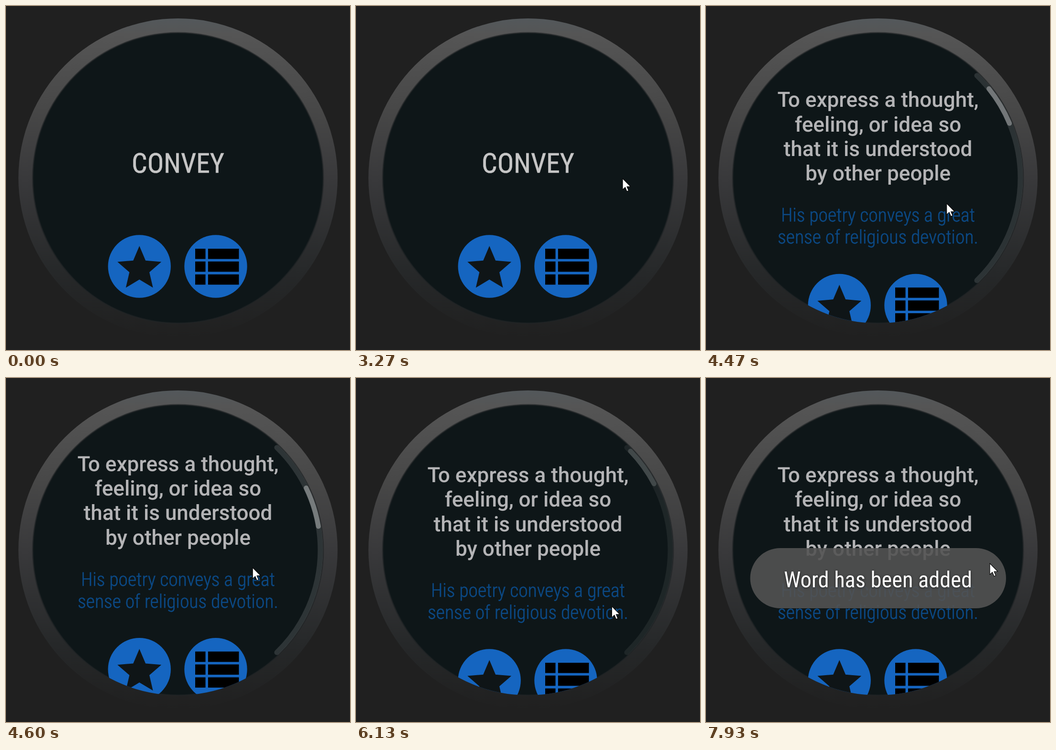
Recreate the animation shown at these times as an HTML page. Size 720x720 px, loop 8 s.

```html
<!DOCTYPE html>
<html lang="en">
<head>
<meta charset="utf-8">
<title>Word of the day on a watch</title>
<style>
  html, body { margin: 0; width: 100%; height: 100%; overflow: hidden; background: #202020; }
  svg { display: block; width: 100vw; height: 100vh; }
  text { font-family: Roboto, sans-serif; text-anchor: middle; text-rendering: geometricPrecision; }
  .narrow { font-family: "Roboto Condensed", Roboto, sans-serif; font-stretch: 75%; stroke-width: .6; }
  .word { font-size: 57.5px; fill: #c6c6c6; stroke: #c6c6c6; }
  .meaning { font-size: 44px; font-weight: 500; fill: #b4b4b6; }
  .example { font-size: 39.6px; font-weight: 300; fill: #0c4a86; stroke: #0c4a86; }
  .note { font-size: 46.4px; fill: #fff; text-shadow: 0 1px 5px rgba(0, 0, 0, .6); }
</style>
</head>
<body>
<svg viewBox="0 0 720 720">
  <defs>
    <linearGradient id="bezel" gradientUnits="userSpaceOnUse" x1="0" y1="26" x2="0" y2="694">
      <stop offset="0" stop-color="#53585b"/>
      <stop offset=".05" stop-color="#555"/>
      <stop offset=".29" stop-color="#474747"/>
      <stop offset=".5" stop-color="#39393b"/>
      <stop offset=".8" stop-color="#262829"/>
      <stop offset="1" stop-color="#202020"/>
    </linearGradient>
    <clipPath id="face"><circle cx="360" cy="360" r="304"/></clipPath>
  </defs>
  <rect width="720" height="720" fill="#202020"/>
  <circle cx="360" cy="360" r="334" fill="url(#bezel)"/>
  <circle cx="360" cy="360" r="304" fill="#0e1618" stroke="#222627" stroke-opacity=".6" stroke-width="3"/>
  <g clip-path="url(#face)">
    <g id="word"></g>
    <g id="page"></g>
    <g id="buttons">
      <circle cx="279.2" cy="545" r="65.7" fill="#1565c0"/>
      <circle cx="439" cy="545" r="65.7" fill="#1565c0"/>
      <path transform="translate(224 493) scale(4.6)" fill="#0f1517"
        d="M12 17.27 18.18 21 16.54 13.97 22 9.24 14.81 8.63 12 2 9.19 8.63 2 9.24 7.46 13.97 5.82 21z"/>
      <path transform="translate(374.5 481) scale(5.38)"
        d="M4 5h4v4H4zM4 10h4v4H4zM4 15h4v4H4zM9 5h12v4H9zM9 10h12v4H9zM9 15h12v4H9z"/>
    </g>
    <g id="bar" fill="none" stroke="#fff" stroke-linecap="round">
      <path id="track" stroke-width="11" stroke-opacity=".13"/>
      <path id="thumb" stroke-width="10" stroke-opacity=".35"/>
    </g>
  </g>
  <g id="toast">
    <rect x="92.5" y="356" width="535.5" height="126" rx="63" fill="#535353" fill-opacity=".9"/>
  </g>
  <path id="cursor" fill="#fff" stroke="#0a0a0a" stroke-width="1.2" stroke-linejoin="round"
    d="M0 0V23.5L5.4 18.4 8.9 27 12.6 25.5 9 17H16.8Z"/>
</svg>
<script>
const $ = id => document.getElementById(id);
const LOOP = 8000, FPS = 15;

function addText(parent, cls, y, str) {
  const el = document.createElementNS('http://www.w3.org/2000/svg', 'text');
  el.setAttribute('class', cls);
  el.setAttribute('transform', `translate(360 ${y})`);
  el.textContent = str;
  parent.append(el);
  return el;
}

addText($('word'), 'word narrow', 348.5, 'CONVEY');
['To express a thought,', 'feeling, or idea so', 'that it is understood', 'by other people']
  .forEach((s, i) => addText($('page'), 'meaning', 218 + i * 51.3, s));
['His poetry conveys a great', 'sense of religious devotion.']
  .forEach((s, i) => addText($('page'), 'example narrow', 458 + i * 45.8, s));
addText($('toast'), 'note narrow', 438, 'Word has been added');

// Synthesize the condensed cut only when no real one is installed
const probe = addText($('page'), 'narrow', 0, 'condensed');
const slim = probe.getComputedTextLength();
probe.setAttribute('class', '');
const hasNarrow = slim < probe.getComputedTextLength() * 0.95;
probe.remove();
if (!hasNarrow) {
  for (const el of document.querySelectorAll('.narrow')) {
    el.setAttribute('transform', el.getAttribute('transform') + ' scale(.882 1)');
  }
}

// Smooth 0 to 1 between two times
function ramp(t, from, to) {
  const p = Math.min(1, Math.max(0, (t - from) / (to - from)));
  return p * p * (3 - 2 * p);
}

// Pointer strokes: start, end, destination
const strokes = [
  { from: 2467, to: 3000, x: 558, y: 361 },
  { from: 3800, to: 4133, x: 488, y: 434 },
  { from: 4250, to: 4680, x: 519, y: 393 },
  { from: 5067, to: 5467, x: 546, y: 433 },
  { from: 5467, to: 5800, x: 551, y: 469 },
  { from: 6000, to: 6867, x: 306, y: 608 },
  { from: 7100, to: 7933, x: 594, y: 388 }
];

function pointerAt(t) {
  let x = 352, y = 329.5;
  for (const s of strokes) {
    const p = ramp(t, s.from, s.to);
    x += (s.x - x) * p;
    y += (s.y - y) * p;
  }
  return `${x} ${y}`;
}

function arc(from, to) {
  const at = deg => {
    const r = deg * Math.PI / 180;
    return `${360 + 298 * Math.cos(r)} ${360 + 298 * Math.sin(r)}`;
  };
  return `M${at(from)}A298 298 0 0 1 ${at(to)}`;
}
$('track').setAttribute('d', arc(-46, 46));

function draw(ms) {
  const t = Math.floor((ms % LOOP + 4) * FPS / 1000) * 1000 / FPS;
  const opened = t >= 3330;
  const shift = 27 * (ramp(t, 4370, 4670) - ramp(t, 5467, 5800));
  const start = -44 + shift * 0.78;

  $('word').style.display = opened ? 'none' : '';
  $('page').style.display = opened ? '' : 'none';
  $('page').setAttribute('transform', `translate(0 ${-shift})`);
  $('buttons').setAttribute('transform', `translate(0 ${opened ? 88 - shift : 0})`);
  $('thumb').setAttribute('d', arc(start, start + 16.3));
  $('bar').setAttribute('opacity', ramp(t, 4370, 4480) - ramp(t, 6000, 6267));
  $('toast').setAttribute('opacity', ramp(t, 7267, 7800));
  $('cursor').style.display = t >= 1930 ? '' : 'none';
  $('cursor').setAttribute('transform', `translate(${pointerAt(t)})`);
}

let origin;
function tick(now) {
  origin ??= now;
  draw(now - origin);
  requestAnimationFrame(tick);
}
draw(0);
requestAnimationFrame(tick);
</script>
</body>
</html>
```
